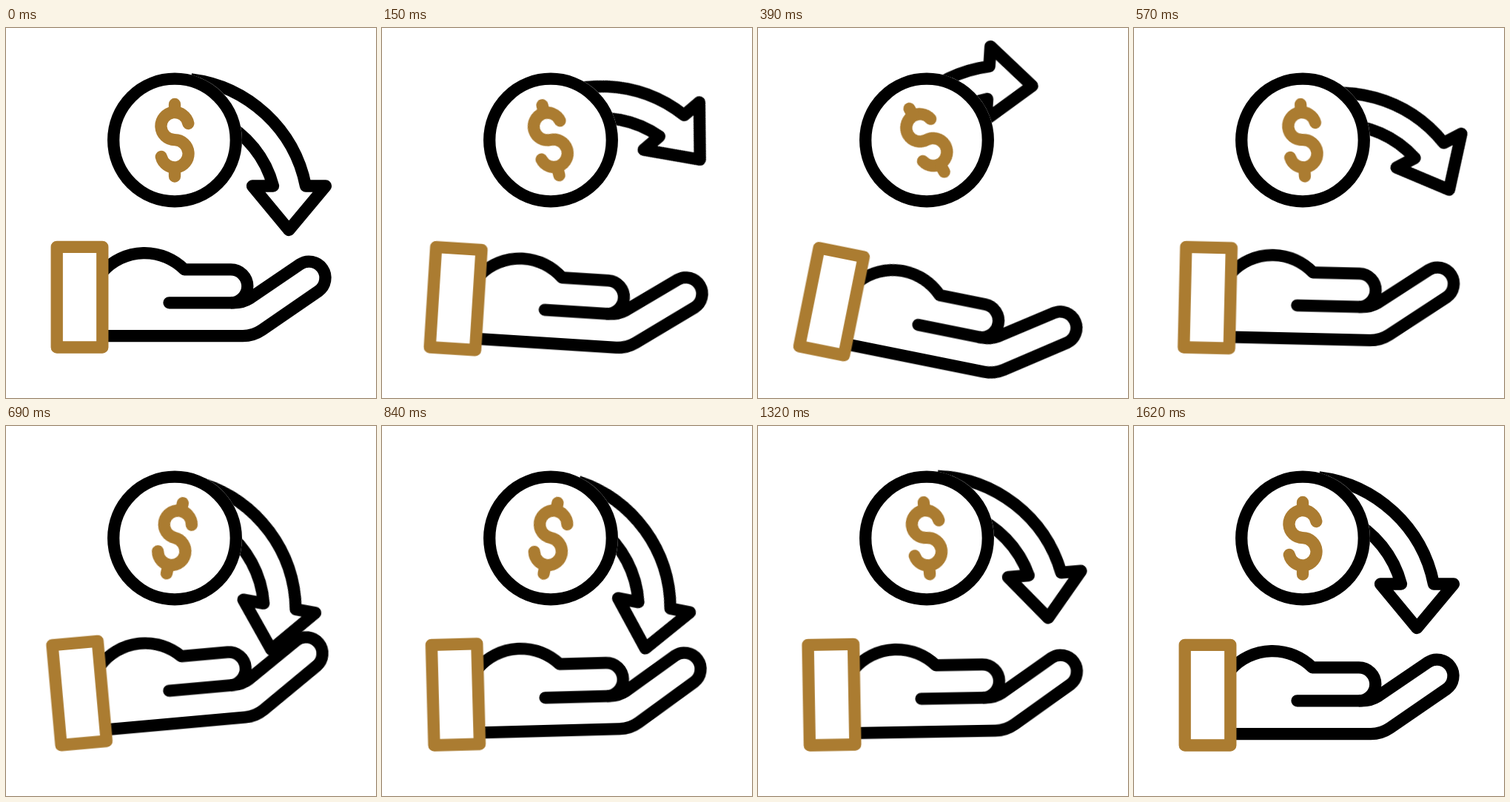
Write an HTML page that moves like this. It is 500 by 500 pixels and loops after 1.8 s.

```html
<!DOCTYPE html>
<html lang="en">
<head>
<meta charset="utf-8">
<title>Receive money</title>
<style>
  html, body { margin: 0; width: 100%; height: 100%; overflow: hidden; background: #fff; }
  svg { display: block; width: 100%; height: 100%; }
  .line { fill: none; stroke: #000; stroke-width: 16.3; stroke-linejoin: round; }
  .round { stroke-linecap: round; }
  .gold { stroke: #ab7c31; }
  #lift, #arrow, #dollar { transform-origin: 228px 151.5px; }
  #hand { transform-origin: 69px 366px; }
</style>
</head>
<body>
<svg viewBox="0 0 500 500">
  <g id="lift" class="line">
    <path id="arrow" d="M250 69.3A180.5 180.5 0 0 1 405 213.5H432L382.3 273L333 213.5H361A137.7 137.7 0 0 0 290 125.4"/>
  </g>
  <circle cx="228" cy="151.5" r="91" fill="#fff"/>
  <circle class="line" cx="228" cy="151.5" r="82.8"/>
  <g id="dollar" class="line round gold">
    <path d="M246.3 129A18.6 18.6 0 1 0 228 151.2A18.6 18.6 0 1 1 209.8 174"/>
    <path d="M228 103V112M228 191V200.5"/>
  </g>
  <g id="hand" class="line">
    <path d="M131 329A76 76 0 0 1 241 326.3H303.8A22.5 22.5 0 0 1 303.8 371.3"/>
    <path class="round" d="M220.5 371.3H308Q320 371.3 330 365L397.3 319.3A22 22 0 0 1 422.3 355.5L346 408Q334 416.2 320 416.2H134"/>
    <rect class="gold" x="68.7" y="295.8" width="61.6" height="135.7"/>
  </g>
</svg>
<script>
  const LOOP = 1800, REST = 1620;
  const COIN = { peak: 355, beat: 385 };
  const HAND = { peak: 402, beat: 295 };
  const SWING = 'cubic-bezier(.333,0,.667,1)';
  const START = 'cubic-bezier(.28,0,.6,1)';

  const key = (ms, deg, x = 0, y = 0, easing = SWING) => ({
    offset: ms / LOOP,
    transform: `translate(${x}px, ${y}px) rotate(${deg}deg)`,
    easing
  });

  const play = (id, keys) =>
    document.getElementById(id).animate(keys, { duration: LOOP, iterations: Infinity });

  // A swing that flips and shrinks on every beat, then settles
  function sway(id, { peak, beat }, deg, damp, easing) {
    const keys = [key(0, 0, 0, 0, easing)];
    for (let ms = peak; ms < REST - beat / 2; ms += beat, deg *= -damp) keys.push(key(ms, deg));
    play(id, [...keys, key(REST, 0), key(LOOP, 0)]);
  }

  sway('arrow', COIN, -30, 0.5, START);
  sway('dollar', COIN, -30, 0.5, START);
  sway('hand', HAND, 11.4, 0.45);

  // The arrow also tucks behind the coin on its first swing
  play('lift', [
    key(0, 0, 0, 0, START),
    key(COIN.peak, -59, 12, 75),
    key(COIN.peak + COIN.beat, 0),
    key(LOOP, 0)
  ]);
</script>
</body>
</html>
```
